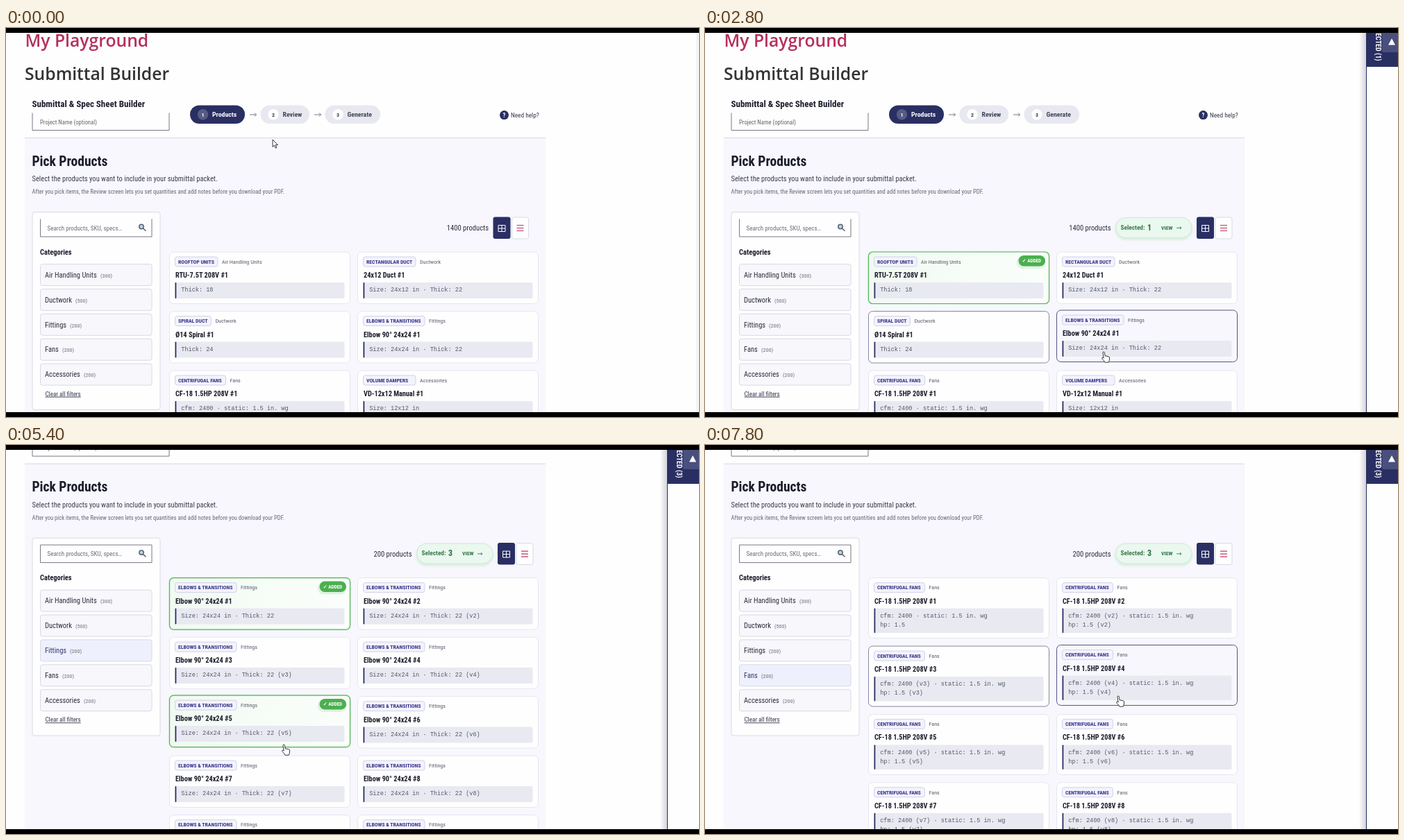
An HTML page for the animation above (8000 ms loop, 998 by 561 pixels).

```html
<!DOCTYPE html>
<html lang="en">
<meta charset="utf-8">
<title>Submittal Builder</title>
<style>
html, body { margin: 0; height: 100%; overflow: hidden; background: #fefefe }
svg { display: block; width: 998px; height: 561px }
text { font-family: "Roboto Condensed", Roboto, sans-serif; font-stretch: 75%; white-space: pre }
.b { font-weight: 700 }
.m { font-family: "Liberation Mono", monospace; font-stretch: 100% }
.h { font-family: "Open Sans", sans-serif; font-stretch: 100%; font-weight: 600 }
.u { text-decoration: underline }
</style>
<svg id="stage" viewBox="0 0 998 561"></svg>
<script>
const LOOP = 8000, STEP = 200;
const NAVY = '#2a2f63', INK = '#1c1d2b', GREEN = '#4caf50';

// tag, tag width, category, title, spec lines
const kinds = {
  rtu: ['ROOFTOP UNITS', 61.5, 'Air Handling Units', 'RTU-7.5T 208V', v => ['Thick: 18']],
  rect: ['RECTANGULAR DUCT', 75.5, 'Ductwork', '24x12 Duct', v => ['Size: 24x12 in · Thick: 22']],
  spiral: ['SPIRAL DUCT', 52, 'Ductwork', 'Ø14 Spiral', v => ['Thick: 24']],
  elbow: ['ELBOWS & TRANSITIONS', 88.5, 'Fittings', 'Elbow 90° 24x24', v => ['Size: 24x24 in · Thick: 22' + v]],
  fan: ['CENTRIFUGAL FANS', 73, 'Fans', 'CF-18 1.5HP 208V', v => [`cfm: 2400${v} · static: 1.5 in. wg`, 'hp: 1.5' + v]],
  damper: ['VOLUME DAMPERS', 75.5, 'Accessories', 'VD-12x12 Manual', v => ['Size: 12x12 in']]
};
const categories = [['Air Handling Units', 300, 80], ['Ductwork', 500, 44], ['Fittings', 200, 36], ['Fans', 200, 25], ['Accessories', 200, 56]];
const clicks = [[1200, 'rtu1'], [3000, 'elbow1'], [5400, 'elbow5']];
const path = [
  [0, 384, 161], [200, 385, 185], [600, 389, 335], [800, 389, 352], [1800, 389, 352], [2200, 398, 368],
  [2600, 455, 435], [2800, 572, 467], [3200, 572, 467], [3400, 340, 450], [3600, 200, 438], [3800, 190, 435],
  [4200, 190, 435], [4600, 398, 432], [5800, 398, 432], [6200, 300, 390], [6600, 140, 331], [6800, 135, 329],
  [7200, 135, 329], [7600, 430, 350], [7800, 593, 362], [8000, 593, 362]
];

const esc = s => String(s).replace(/&/g, '&amp;');
const text = (x, y, s, size, fill = INK, cls = '', more = '') =>
  `<text x="${x}" y="${y}" font-size="${size}" fill="${fill}" class="${cls}" ${more}>${esc(s)}</text>`;
const rect = (x, y, w, h, fill, r = 0, stroke = 'none', more = '') =>
  `<rect x="${x}" y="${y}" width="${w}" height="${h}" rx="${r}" fill="${fill}" stroke="${stroke}" ${more}/>`;
const circle = (x, y, r, fill) => `<circle cx="${x}" cy="${y}" r="${r}" fill="${fill}"/>`;
const line = (d, stroke, w = 1) => `<path d="${d}" fill="none" stroke="${stroke}" stroke-width="${w}"/>`;

function pointer(t) {
  const i = Math.max(1, path.findIndex(p => p[0] >= t));
  const [a, b] = [path[i - 1], path[i]], k = (t - a[0]) / (b[0] - a[0]);
  return [1, 2].map(n => a[n] + (b[n] - a[n]) * k);
}

function stateAt(t) {
  const scroll = t < 4800 ? 0 : t < 5000 ? 87.5 : 131.4;
  const filter = t < 4000 ? '' : t < 7000 ? 'elbow' : 'fan';
  const chosen = clicks.filter(c => t >= c[0]).map(c => c[1]);
  const list = filter ? Array.from({ length: 10 }, (_, i) => [filter, i + 1]) : Object.keys(kinds).map(k => [k, 1]);
  const tall = filter === 'fan', h = tall ? 87 : 74.5, pitch = tall ? 98.4 : 85.5;
  const cards = list.map(([kind, n], i) => ({ id: kind + n, kind, n, x: i % 2 ? 506.5 : 235.5, y: 323 + (i >> 1) * pitch, h }));
  const [x, y] = pointer(t), py = y + scroll;
  const card = cards.find(c => x > c.x && x < c.x + 260 && py > c.y && py < c.y + h);
  const row = Math.floor((py - 340) / 36);
  const item = x > 49 && x < 210 && categories[row] ? categories[row][0] : '';
  return { scroll, filter, chosen, cards, x, y, hover: card ? card.id : item };
}

function drawCard(c, s, before) {
  const [tag, w, cat, title, spec] = kinds[c.kind];
  const over = s.hover === c.id, was = before.hover === c.id, on = s.chosen.includes(c.id);
  // Scrolling under a still pointer delays the outline by one step.
  const outlined = s.scroll === before.scroll ? over : was;
  const edge = on ? '#56b45c' : outlined ? '#54567f' : was ? '#85879f' : '#e6e6ef';
  const bg = on ? 'url(#picked)' : over ? '#f7f7fd' : '#fefefe';
  const lines = spec(c.n > 1 ? ` (v${c.n})` : '');
  return `<g transform="translate(${c.x} ${c.y - (over ? 1.5 : 0)})">` +
    (on ? rect(0, 0, 260, c.h, 'none', 6, '#dcf1de', 'stroke-width="3"') : '') +
    rect(0, 0, 260, c.h, bg, 6, edge, on ? 'stroke-width="1.2"' : '') +
    rect(8, 7, w, 14, '#f3f3fd', 3, '#d2d1ea') +
    text(12.5, 16.9, tag, 7.75, '#373287', 'b') +
    text(w + 14, 16.8, cat, 8.1, '#5a5c6b') +
    text(8.5, 37, title + ' #' + c.n, 10.25, INK, 'b') +
    rect(8, 44, 244, c.h - 51.5, '#e9e9f2', 2) + rect(8, 44, 1.8, c.h - 51.5, NAVY, .8) +
    lines.map((l, i) => text(16.7, 57.4 + i * 13, l, 8.58, '#555867', 'm')).join('') +
    (on ? rect(213, 6, 42, 18, '#dff3e2', 9) + rect(216, 5, 38.5, 15.5, GREEN, 7.7) +
      text(221, 15, '✓ ADDED', 7.2, '#fff', 'b') : '') + '</g>';
}

function drawHeader(scrolled) {
  const step = (x, w, n, label, active) =>
    rect(x, 111.5, w, 26.5, active ? NAVY : '#e8e8f0', 13.2) + circle(x + 18.5, 124.8, 7.7, active ? '#565a84' : '#fefefe') +
    text(x + 18.5, 127.7, n, 8, active ? '#fff' : '#3b3f5c', 'b', 'text-anchor="middle"') +
    text(x + 32, 128.3, label, 9.8, active ? '#fff' : '#43465c', 'b');
  const arrow = x => line(`M${x} 125h9.500m-2.500-2.500l2.500 2.500l-2.500 2.500`, '#666876', .9);
  return text(27.5, 27, 'My Playground', 24.7, '#b5305f', 'h') + text(27, 75, 'Submittal Builder', 24.7, '#333', 'h') +
    text(37.5, 113.5, 'Submittal & Spec Sheet Builder', 13, INK, 'b') +
    field(38, 122.5, 197, 25, scrolled) + text(49, 138.5, 'Project Name (optional)', 8.7, '#666') +
    step(265, 79, 1, 'Products', true) + arrow(351) + step(366.5, 70.5, 2, 'Review') + arrow(444) + step(459.5, 79.5, 3, 'Generate') +
    circle(717.5, 125.6, 6.5, NAVY) + text(717.5, 128.8, '?', 8.5, '#fff', 'b', 'text-anchor="middle"') +
    text(727, 128.8, 'Need help?', 9.3, '#35374a') +
    rect(27, 158, 750, 720, '#f7f7fd') + rect(27, 158, 750, 1, '#d8d8df') +
    text(37.5, 198.7, 'Pick Products', 19.5, INK, 'b') +
    text(37.5, 221, 'Select the products you want to include in your submittal packet.', 10.5, '#3b3d4d') +
    text(37.5, 239.3, 'After you pick items, the Review screen lets you set quantities and add notes before you download your PDF.', 8.55, '#666877');
}

// The top edge of a field only shows once the page has scrolled.
const field = (x, y, w, h, scrolled) => rect(x, y, w, h, '#fefefe', 2) +
  line(`M${x} ${y}v${h}h${w}v${-h}${scrolled ? 'z' : ''}`, '#777986');

function drawSidebar(s) {
  const current = s.filter && kinds[s.filter][2];
  return rect(38, 265.5, 184, 285, '#fefefe', 3, '#d9dae4') + field(49.5, 275.5, 160.5, 25.5, s.scroll) +
    text(59.5, 291.7, 'Search products, SKU, specs…', 9.1, '#6c6e7b') +
    circle(195, 286.5, 3.2, '#b9d3e6') + line('M198.200 286.500a3.200 3.200 0 1 0-6.400 0a3.200 3.200 0 1 0 6.400 0M197.500 289l4 3.700', '#59616f', 1.5) +
    text(49, 326.8, 'Categories', 10.5, INK, 'b') +
    categories.map(([name, count, w], i) => {
      const y = 340.5 + i * 35.9, fill = s.hover === name ? '#e9e9f1' : current === name ? '#eef0fd' : '#f7f7fc';
      return rect(49.5, y, 160.5, 31, fill, 3, '#d8d9e4') +
        text(56, y + 19.2, name, 10.5, current === name ? '#38386f' : '#2c2e3d') + text(56 + w, y + 19.2, `(${count})`, 8.1, '#6c6e7c');
    }).join('') + text(56.5, 530.7, 'Clear all filters', 9, '#34364a', 'u');
}

function drawTools(s) {
  const n = s.chosen.length, x = n ? 708 : 701.5;
  return text(n ? 584.5 : 695, 292, (s.filter ? 200 : 1400) + ' products', 10.6, '#2c2e3d', '', 'text-anchor="end"') +
    (n ? rect(590, 274, 112, 32, '#dcefe2', 16, 'none', 'filter="url(#soft)"') + rect(591.5, 273.5, 109.5, 29, '#eaf8ef', 14.5, '#cdebd6') +
      text(598.5, 290.7, 'Selected:', 9.3, '#3d7a4b', 'b') + text(637, 291.7, n, 12, '#2e7040', 'b') +
      text(657, 290.9, 'VIEW', 7.9, '#34784a', 'b') + line('M679 288.300h7m-2-1.800l2 1.800l-2 1.800', '#34784a', .9) : '') +
    rect(x, 272.5, 25, 31.5, NAVY, 3) + line(`M${x + 7.5} 284.500h10v9h-10zm5 0v9m-5-4.500h10`, '#fff') +
    rect(x + 27, 273, 24, 31, '#fefefe', 3, '#d9dae4') +
    line(`M${x + 34} 284.500h10m-10 4h10m-10 4h10`, '#b83a66', 1.1);
}

function drawPanel(n) {
  if (!n) return rect(994, 0, 4, 561, '#f3f3f5');
  return rect(942, 0, 10, 561, 'url(#shade)') + rect(952, 0, 46, 561, '#fefefe') + rect(952, 0, 1, 561, NAVY) + rect(952, 0, 46, 56, NAVY) +
    text(0, 0, `SELECTED (${n})`, 10, '#fff', 'b', 'text-anchor="end" transform="translate(965.5 47.5) rotate(90)"') +
    rect(975, 5, 24, 30, '#4a4f7c', 2) + '<path d="M984 24.500l5-9.500l5 9.500z" fill="#fff"/>';
}

function drawCursor(s) {
  const shape = s.hover
    ? 'M1 2q-.3-1.900 1-2t1.500 1.600l.5 4.200l4.800.9q2 .5 1.900 2.400l-.4 3q-.2 1.500-1.100 3.100h-5.300q-1.200-2.600-3.800-4.900q-1.100-1.300 0-2t2.100.8z'
    : 'M0 0v10.500l2.500-2.300l1.700 4l1.700-.7l-1.700-3.900h3.300z';
  return `<path transform="translate(${s.x} ${s.y})" d="${shape}" fill="#fff" stroke="#222" stroke-width=".9" stroke-linejoin="round"/>`;
}

const defs = `<defs>
  <linearGradient id="picked"><stop stop-color="#f1faf2"/><stop offset="1" stop-color="#fbfefb"/></linearGradient>
  <linearGradient id="shade"><stop stop-color="#fefefe"/><stop offset="1" stop-color="#d2d2da"/></linearGradient>
  <filter id="soft"><feGaussianBlur stdDeviation="1.5"/></filter></defs>`;

function draw(t) {
  const s = stateAt(t), before = stateAt(Math.max(0, t - STEP));
  stage.innerHTML = defs + rect(0, 0, 998, 561, '#fefefe') + `<g transform="translate(0 ${-s.scroll})">` +
    drawHeader(s.scroll) + drawSidebar(s) + drawTools(s) + s.cards.map(c => drawCard(c, s, before)).join('') + '</g>' +
    drawPanel(s.chosen.length) + drawCursor(s) + rect(0, 0, 998, 7, '#000') + rect(0, 554, 998, 7, '#000');
}

const stage = document.getElementById('stage');
let shown = -1;
function tick(now) {
  const t = Math.floor(now % LOOP / STEP) * STEP;
  if (t !== shown) draw(shown = t);
  requestAnimationFrame(tick);
}
tick(performance.now());
</script>
</html>
```
